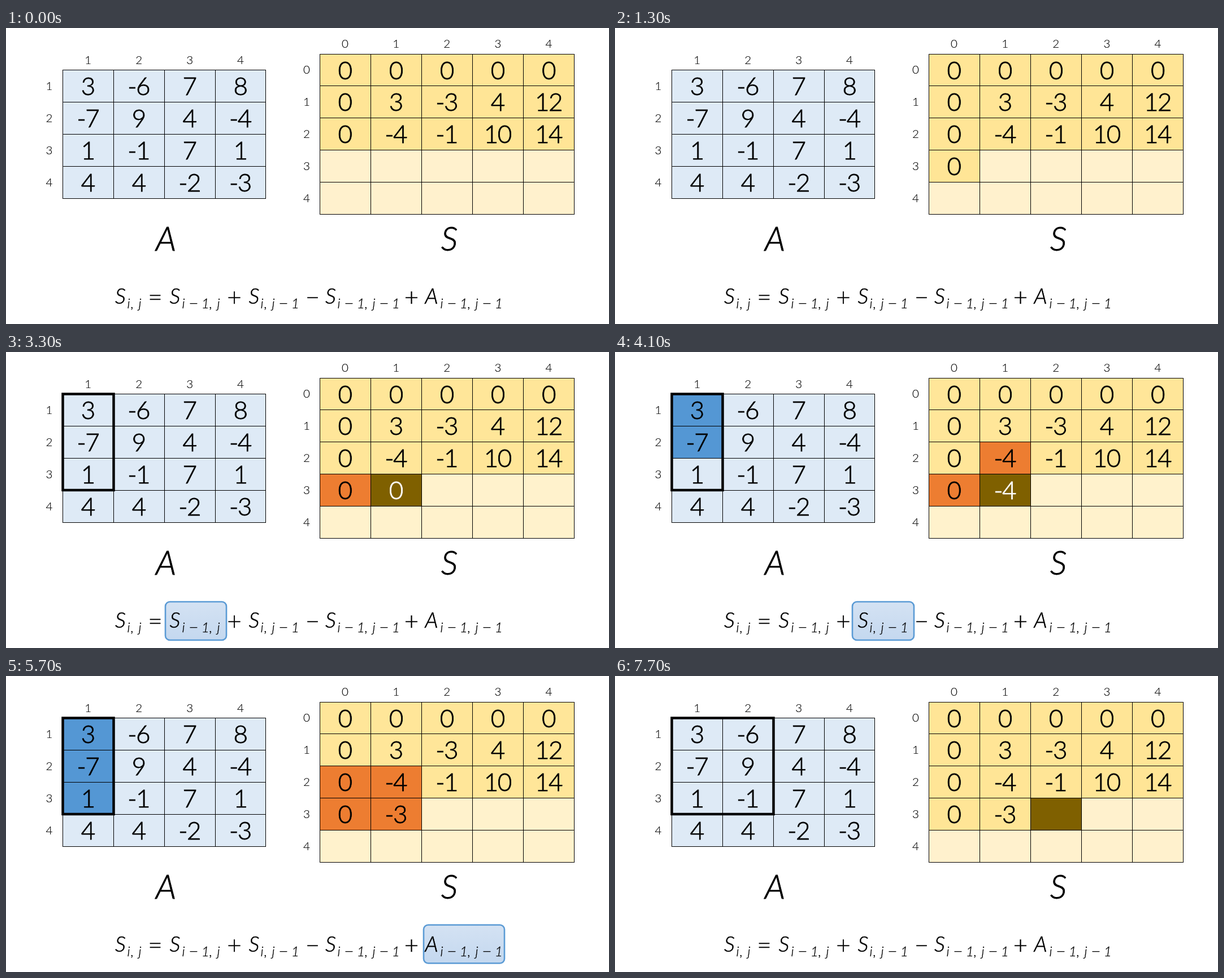
An HTML page that plays this animation: 1067x525 px, repeating every 8000 ms.

```html
<!DOCTYPE html>
<html lang="en">
<head>
<meta charset="utf-8">
<title>Prefix sums of a matrix</title>
<style>
  html, body { margin: 0; width: 100%; height: 100%; overflow: hidden; background: #fff; }
  svg { display: block; width: 1067px; height: 525px; }
  text { font-family: Lato, "Open Sans", sans-serif; font-weight: 300; text-anchor: middle; stroke: #000; stroke-width: .3; }
  .num { font-size: 44px; letter-spacing: -1.5px; stroke-width: .8; }
  .label { font-size: 20.5px; stroke-width: .15; }
  .name { font-size: 59.5px; font-style: italic; stroke-width: .9; }
  .var { font-size: 38px; font-style: italic; stroke-width: .6; }
  .op { font-size: 44px; stroke-width: .4; }
  .sub { font-size: 24px; font-style: italic; }
  .dash { font-size: 30px; }
  .cell { stroke: #000; stroke-width: 1; shape-rendering: crispEdges; }
  .frame { fill: none; stroke: #000; stroke-width: 4.5; }
  .mark { fill: url(#glow); stroke: #5b9bd5; stroke-width: 2.6; }
</style>
</head>
<body>
<svg id="stage" viewBox="0 0 1067 525">
  <defs>
    <linearGradient id="glow" x1="0" y1="0" x2="0" y2="1">
      <stop offset="0" stop-color="#d4e2f3"/>
      <stop offset="1" stop-color="#c4d8ef"/>
    </linearGradient>
  </defs>
</svg>
<script>
const LOOP = 8000;
const ORANGE = '#ed7d31', DARK = '#7f6000', BLUE = '#5497d4';
const stage = document.getElementById('stage');

function add(tag, attrs, content) {
  const el = document.createElementNS('http://www.w3.org/2000/svg', tag);
  for (const key in attrs) el.setAttribute(key, attrs[key]);
  if (content !== undefined) el.textContent = content;
  stage.append(el);
  return el;
}
const write = (cls, x, y, s) => add('text', { class: cls, x, y }, s);

function makeGrid(x, y, w, h, cols, rows, first, labelX, labelY) {
  const cells = [];
  for (let r = 0; r < rows; r++) {
    for (let c = 0; c < cols; c++) {
      const left = Math.floor(x + c * w), top = Math.floor(y + r * h);
      const box = add('rect', {
        class: 'cell', x: left + .5, y: top + .5,
        width: Math.floor(x + (c + 1) * w) - left,
        height: Math.floor(y + (r + 1) * h) - top
      });
      cells.push({ box, r: r + first, c: c + first });
    }
  }
  cells.forEach((cell, i) => {
    const c = i % cols, r = Math.floor(i / cols);
    cell.text = write('num', x + (c + .5) * w - .5, y + (r + .5) * h + 16.2, '');
  });
  for (let c = 0; c < cols; c++) write('label', x + (c + .5) * w, labelY, c + first);
  for (let r = 0; r < rows; r++) write('label', labelX, y + (r + .5) * h + 7, r + first);
  return cells;
}

function paint(cell, fill, value, ink = '#000') {
  cell.box.setAttribute('fill', fill);
  cell.text.style.fill = cell.text.style.stroke = ink;
  if (cell.text.textContent !== String(value)) cell.text.textContent = value;
}

const A = [[3, -6, 7, 8], [-7, 9, 4, -4], [1, -1, 7, 1], [4, 4, -2, -3]];
const S = [[0, 0, 0, 0, 0], [0, 3, -3, 4, 12], [0, -4, -1, 10, 14]];

const gridA = makeGrid(100.35, 74, 89.9, 57, 4, 4, 1, 76.5, 64);
const gridS = makeGrid(555, 46, 90.1, 56.8, 5, 5, 0, 532, 35);
const frame = add('rect', { class: 'frame', x: 100.5, y: 74.5, height: 170.5 });
const mark = add('rect', { class: 'mark', rx: 8, height: 68 });

write('name', 283, 395, 'A');
write('name', 784.5, 395, 'S');

// Formula: each term is a letter followed by a spaced-out index
const ADVANCE = { 'i': 6, 'j': 6, ',': 7, ' ': 7, '1': 12, '−': 16 };
function term(letter, x, subX, index) {
  write('var', x, 489, letter);
  for (const ch of index) {
    const w = ADVANCE[ch];
    if (ch === '−') write('dash', subX + w / 2, 499, ch);
    else if (ch !== ' ') write('sub', subX + w / 2, 497, ch);
    subX += w;
  }
}
term('S', 202.5, 214, 'i, j');
term('S', 299, 311, 'i − 1, j');
term('S', 439, 450, 'i, j − 1');
term('S', 574.5, 586, 'i − 1, j − 1');
term('A', 753, 768, 'i − 1, j − 1');
[['=', 264], ['+', 404], ['−', 542.5], ['+', 717.5]]
  .forEach(([s, x]) => write('op', x, 493, s));

// done: values finished in row 3; cur: active column; cols: outlined columns of A
const steps = [
  { at: 0, done: [] },
  { at: 500, done: [], cur: 0, value: '' },
  { at: 1300, done: [0] },
  { at: 2500, done: [0], cur: 1, value: '', cols: 1 },
  { at: 3300, done: [0], cur: 1, value: 0, cols: 1, hot: ['3,0'], mark: [282, 443, 108] },
  { at: 4100, done: [0], cur: 1, value: -4, cols: 1, hot: ['3,0', '2,1'], sum: 2, mark: [420, 443, 109] },
  { at: 4900, done: [0], cur: 1, value: -4, cols: 1, hot: ['3,0', '2,1', '2,0'], sum: 2, mark: [557, 443, 145] },
  { at: 5700, done: [0, -3], cols: 1, hot: ['3,0', '2,1', '2,0', '3,1'], sum: 3, mark: [739, 441.5, 143] },
  { at: 6500, done: [0, -3] },
  { at: 7700, done: [0, -3], cur: 2, value: '', cols: 2 }
];

function show(step) {
  const full = step.mark ? '#ffe699' : '#ffe596';
  const pale = step.mark ? '#fff2cc' : '#fff1cd';
  const hot = step.hot || [];
  const rows = [...S, step.done];

  for (const cell of gridA) {
    const summed = cell.c === 1 && cell.r <= (step.sum || 0);
    paint(cell, summed ? BLUE : '#deeaf6', A[cell.r - 1][cell.c - 1]);
  }
  for (const cell of gridS) {
    const { r, c } = cell;
    const value = rows[r] && rows[r][c];
    if (r === 3 && c === step.cur) paint(cell, DARK, step.value, '#fff');
    else if (hot.includes(r + ',' + c)) paint(cell, ORANGE, value);
    else if (value === undefined) paint(cell, pale, '');
    else paint(cell, full, value);
  }

  frame.setAttribute('width', 90 * (step.cols || 0));
  frame.style.display = step.cols ? '' : 'none';
  mark.style.display = step.mark ? '' : 'none';
  if (step.mark) {
    ['x', 'y', 'width'].forEach((key, i) => mark.setAttribute(key, step.mark[i]));
  }
}

let shown, start;
function tick(now) {
  if (start === undefined) start = now;
  const t = (now - start) % LOOP;
  const step = steps.filter(s => s.at <= t).pop();
  if (step !== shown) show(shown = step);
  requestAnimationFrame(tick);
}
show(shown = steps[0]);
requestAnimationFrame(tick);
</script>
</body>
</html>
```
